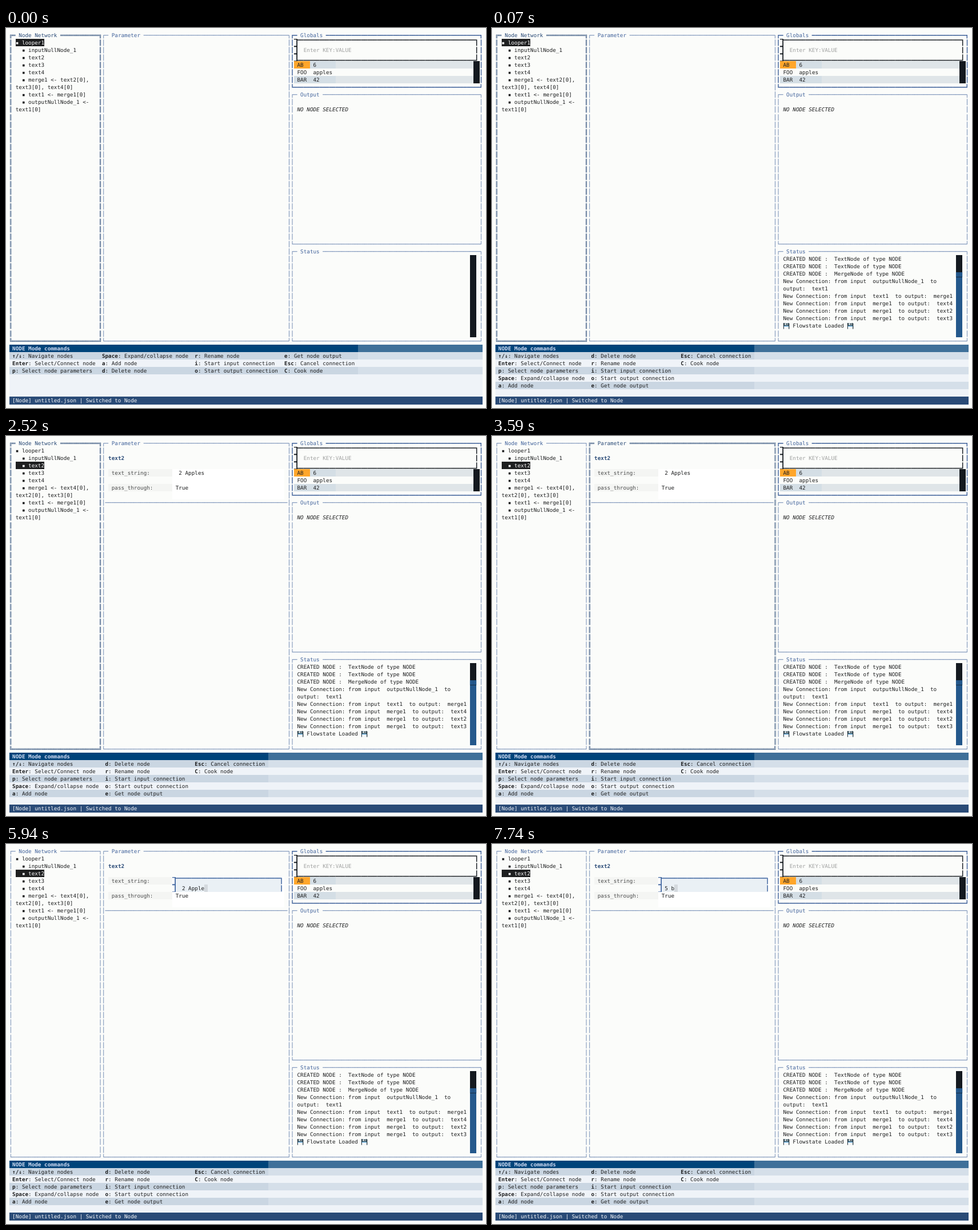
Recreate the animation shown at these times as an HTML page. Size 840x666 px, loop 7.99 s.

```html
<!DOCTYPE html>
<html lang="en">
<head>
<meta charset="utf-8">
<title>Node editor terminal</title>
<style>
  html, body { margin: 0; width: 100%; height: 100%; overflow: hidden; background: #fbfcfa; }
  svg { display: block; width: 840px; height: 666px; }
  text {
    font: 9.302px "DejaVu Sans Mono", monospace;
    white-space: pre;
    text-rendering: geometricPrecision;
  }
  .bold { font-weight: bold; }
  .italic { font-style: italic; }
  rect { shape-rendering: crispEdges; }
</style>
</head>
<body>
<svg id="stage" viewBox="0 0 840 666"></svg>
<script>
const LOOP = 7990;
const CELL_W = 5.6, CELL_H = 13.07, LEFT = 5.5, TOP = 6, BASE = 9.75;
const INK = '#1e1f20', PAPER = '#fbfcfa', DARK = '#14191f';
const BLUE = '#43649c', NAVY = '#2a4b77', THUMB = '#24588c';
const SINGLE = '┌─┐│└┘', DOUBLE = '╔═╗║╚╝', HEAVY = '┏━┓┃┗┛';

const stage = document.getElementById('stage');
const layers = [];
let parent = stage;

const colX = c => LEFT + c * CELL_W;
const rowY = r => TOP + r * CELL_H;

function add(tag, attrs) {
  const el = document.createElementNS('http://www.w3.org/2000/svg', tag);
  for (const key in attrs) el.setAttribute(key, attrs[key]);
  parent.appendChild(el);
  return el;
}

// Text and fills are placed on the character grid.
function put(c, r, str, fill = INK, cls = '') {
  const el = add('text', { x: colX(c), y: rowY(r) + BASE, fill, class: cls });
  el.textContent = str;
  return el;
}

function fillCells(c, r, cols, rows, fill) {
  return add('rect', { x: colX(c), y: rowY(r), width: cols * CELL_W, height: rows * CELL_H, fill });
}

// Contents are visible only while from <= time < to.
function layer(from, to, draw) {
  parent = add('g', {});
  layers.push({ el: parent, from, to });
  draw();
  parent = stage;
}

function box(c0, r0, c1, r1, title, style, color) {
  const [tl, h, tr, v, bl, br] = style;
  const head = `${tl}${h} ${title} `;
  put(c0, r0, head + h.repeat(c1 - c0 - head.length) + tr, color);
  for (let r = r0 + 1; r < r1; r++) {
    put(c0, r, v, color);
    put(c1, r, v, color);
  }
  put(c0, r1, bl + h.repeat(c1 - c0 - 1) + br, color);
}

// Input frame made of partial blocks; row gaps on the left show the frame colour.
function inputFrame(c0, c1, r0, r1, color, inside, outside, closed) {
  const span = c1 - c0 - 1;
  fillCells(c0, r0, span + 2, r1 - r0 + 1, outside);
  fillCells(c0 + 1, r0, span, r1 - r0 + 1, inside);
  fillCells(c0, r0, 1, r1 - r0 + 1, color);
  for (let r = r0; r <= r1; r++) {
    put(c0, r, '▊', outside);
    put(c1, r, '▎', color);
  }
  put(c0 + 1, r0, '▔'.repeat(span), color);
  if (closed) put(c0 + 1, r1, '▁'.repeat(span), color);
}

function floppy(c, r) {
  const x = colX(c) + 0.3, y = rowY(r) + 1.2;
  add('path', { d: `M${x} ${y}h9.4l1.2 1.2v9.4h-10.6z`, fill: '#36474f' });
  add('rect', { x: x + 2.5, y, width: 5.6, height: 3.6, fill: '#b4c3ca' });
  add('rect', { x: x + 5.6, y: y + 0.7, width: 1.4, height: 2.4, fill: '#36474f' });
  add('rect', { x: x + 1.6, y: y + 5.2, width: 7.4, height: 5.4, fill: '#f4f6f7' });
  add('rect', { x: x + 1.6, y: y + 5.2, width: 7.4, height: 1.3, fill: '#3e9fe0' });
}

function commandTable(width, rows, starts, columns) {
  fillCells(0, 42, 148, 1, '#3f7099');
  fillCells(0, 42, width, 1, '#00447a');
  put(1, 42, 'NODE Mode commands', '#d3dcf4', 'bold');
  for (let i = 0; i < rows; i += 2) {
    fillCells(0, 43 + i, 148, 1, '#d5dfe9');
    fillCells(0, 43 + i, width, 1, '#cad6e2');
  }
  columns.forEach((items, i) => items.forEach(([key, label], j) => {
    put(starts[i], 43 + j, key, INK, 'bold');
    put(starts[i] + key.length, 43 + j, ': ' + label);
  }));
}

function logLines(lines) {
  lines.forEach((line, i) => put(90, 30 + i, line));
}

const commands = [
  ['↑/↓', 'Navigate nodes'], ['Enter', 'Select/Connect node'], ['p', 'Select node parameters'],
  ['Space', 'Expand/collapse node'], ['a', 'Add node'], ['d', 'Delete node'],
  ['r', 'Rename node'], ['i', 'Start input connection'], ['o', 'Start output connection'],
  ['e', 'Get node output'], ['Esc', 'Cancel connection'], ['C', 'Cook node'],
];
const columnsOf = n => commands.reduce((out, item, i) => {
  if (i % n === 0) out.push([]);
  out[out.length - 1].push(item);
  return out;
}, []);

const created = ['Looper', 'Text', 'Text', 'Text', 'Text', 'Merge']
  .map(kind => `CREATED NODE :  ${kind}Node of type NODE`);
const linked = (from, to) => `New Connection: from input  ${from}  to output:  ${to}`;
const log = [
  ...created,
  'New Connection: from input  outputNullNode_1  to', 'output:  text1',
  linked('text1', 'merge1'), linked('merge1', 'text4'),
  linked('merge1', 'text2'), linked('merge1', 'text3'),
];

// Node network
layer(0, 3590, () => box(0, 0, 28, 41, 'Node Network', DOUBLE, NAVY));
layer(3590, LOOP, () => box(0, 0, 28, 41, 'Node Network', SINGLE, BLUE));
put(2, 1, '▪ looper1');
['inputNullNode_1', 'text2', 'text3', 'text4'].forEach((name, i) => put(4, 2 + i, '▪ ' + name));
layer(0, 1200, () => {
  put(4, 6, '▪ merge1 <- text2[0],');
  put(2, 7, 'text3[0], text4[0]');
});
layer(1200, LOOP, () => {
  put(4, 6, '▪ merge1 <- text4[0],');
  put(2, 7, 'text2[0], text3[0]');
});
put(4, 8, '▪ text1 <- merge1[0]');
put(4, 9, '▪ outputNullNode_1 <-');
put(2, 10, 'text1[0]');

function select(from, to, row, str) {
  layer(from, to, () => {
    fillCells(2, row, str.length, 1, INK);
    put(2, row, str, '#fbfbfb');
  });
}
select(0, 1200, 1, '▪ looper1');
select(1200, 1540, 2, '  ▪ inputNullNode_1');
select(1540, LOOP, 3, '  ▪ text2');

// Parameter
layer(0, 3590, () => box(29, 0, 87, 41, 'Parameter', SINGLE, BLUE));
layer(3590, 4730, () => box(29, 0, 87, 41, 'Parameter', DOUBLE, NAVY));
layer(4730, LOOP, () => box(29, 0, 87, 41, 'Parameter', SINGLE, BLUE));
layer(2520, LOOP, () => {
  put(31, 2, 'text2', NAVY, 'bold');
  fillCells(31, 4, 20, 1, '#f4f5f3');
  fillCells(31, 6, 20, 1, '#f4f5f3');
  fillCells(51, 4, 35, 4, '#ffffff');
  put(32, 4, 'text_string:', '#4c4d4d');
  put(32, 6, 'pass_through:', '#4c4d4d');
  put(52, 6, 'True');
  put(30, 8, '─'.repeat(57), BLUE);
});
layer(2520, 4120, () => put(53, 4, '2 Apples'));

let cursor, typed;
layer(4120, LOOP, () => {
  inputFrame(51, 85, 4, 5, '#3f659f', '#eaf0f5', '#ffffff', false);
  cursor = fillCells(53, 5, 1, 1, '#d4d9de');
  typed = put(53, 5, '');
});

// Globals
box(88, 0, 147, 7, 'Globals', HEAVY, BLUE);
inputFrame(89, 146, 1, 3, DARK, PAPER, PAPER, true);
put(92, 2, 'Enter KEY:VALUE', '#a0a1a0');
for (const r of [4, 6]) {
  fillCells(89, r, 56, 1, '#dfe5e8');
  fillCells(89, r, 13, 1, '#d4dee5');
}
fillCells(89, 4, 5, 1, '#ffa62b');
fillCells(145, 4, 2, 3, DARK);
[['AB', '6'], ['FOO', 'apples'], ['BAR', '42']].forEach(([key, value], i) => {
  put(90, 4 + i, key);
  put(95, 4 + i, value);
});

// Output
box(88, 8, 147, 28, 'Output', SINGLE, BLUE);
put(90, 10, 'NO NODE SELECTED', INK, 'italic');

// Status
box(88, 29, 147, 41, 'Status', SINGLE, BLUE);
fillCells(144, 30, 2, 11, DARK);
layer(40, 70, () => {
  logLines(log.slice(0, 11));
  fillCells(144, 30, 2, 9, THUMB);
  put(144, 38, '▂▂', DARK);
});
layer(70, LOOP, () => {
  logLines(log.slice(3));
  floppy(90, 39);
  put(93, 39, 'Flowstate Loaded');
  floppy(110, 39);
  fillCells(144, 33, 2, 8, THUMB);
  put(144, 32, '▆▆', THUMB);
});

// Commands and mode line
fillCells(0, 42, 148, 7, '#eff3f8');
layer(0, 40, () => commandTable(110 - 1, 3, [1, 29, 58, 86], columnsOf(3)));
layer(40, LOOP, () => commandTable(81, 5, [1, 30, 58], columnsOf(5)));
fillCells(0, 49, 148, 1, NAVY);
put(1, 49, '[Node] untitled.json | Switched to Node', '#f6f8fb');

function valueAt(t) {
  const old = ' 2 Apples ', fresh = '5 b';
  if (t < 5380) return old;
  if (t < 5940) return old.slice(0, 9);
  if (t < 7140) return old.slice(0, Math.max(0, 8 - Math.floor((t - 5940) / 42.5)));
  return fresh.slice(0, t < 7420 ? 1 : t < 7740 ? 2 : 3);
}

function render(t) {
  for (const { el, from, to } of layers) {
    el.style.display = t >= from && t < to ? '' : 'none';
  }
  const value = valueAt(t);
  if (typed.textContent !== value) typed.textContent = value;
  cursor.setAttribute('x', colX(53 + value.length));
}

const start = performance.now();
function tick() {
  render((performance.now() - start) % LOOP);
  requestAnimationFrame(tick);
}
tick();
</script>
</body>
</html>
```
